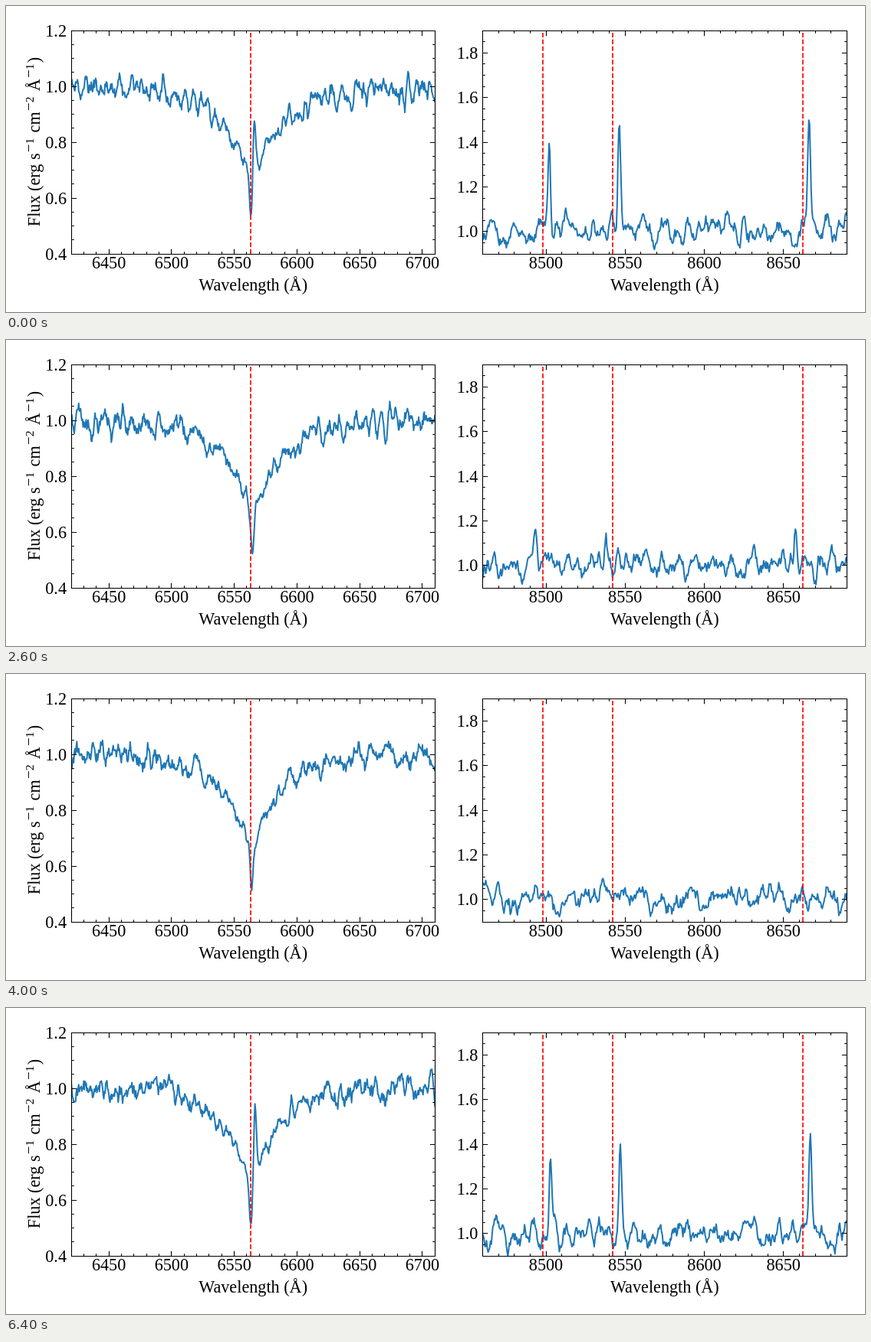
These frames come from a looping animation (1120 px wide and 400 px high, 6600 ms). An HTML page:

```html
<!DOCTYPE html>
<html lang="en">
<head>
<meta charset="utf-8">
<title>Spectra over one orbit</title>
<style>
  html, body { margin: 0; width: 100%; height: 100%; overflow: hidden; background: #fff; }
  svg { display: block; width: 1120px; height: 400px; }
  text { font: 22.2px "Liberation Serif", "Times New Roman", serif; fill: #000; }
  .sup { font-size: 15.5px; }
  .minus { font-size: 19px; }
  .axes { fill: none; stroke: #000; stroke-width: 1.1; }
  .rest { stroke: #f00; stroke-width: 1.67; stroke-dasharray: 6.17 2.67; }
  .flux { fill: none; stroke: #1f77b4; stroke-width: 2; stroke-linejoin: round; }
</style>
</head>
<body>
<svg id="stage" viewBox="0 0 1120 400" xmlns="http://www.w3.org/2000/svg">
  <text transform="translate(43.5 177.5) rotate(-90)" text-anchor="middle">Flux (erg s<tspan class="minus" dx="1.3" dy="-7.5">−</tspan><tspan class="sup">1</tspan><tspan dx="1.7" dy="7.5"> cm</tspan><tspan class="minus" dx="1.3" dy="-7.5">−</tspan><tspan class="sup">2</tspan><tspan dx="1.7" dy="7.5"> Å</tspan><tspan class="minus" dx="1.3" dy="-7.5">−</tspan><tspan class="sup">1</tspan><tspan dx="1.3" dy="7.5">)</tspan></text>
</svg>
<script>
const stage = document.getElementById('stage');
const STEP = 200, COUNT = 33;
const TOP = 32, BOTTOM = 324;
const H_ALPHA = 6562.8;
const CALCIUM = [8498, 8542.1, 8662.1];
const CALCIUM_GAIN = [0.85, 1, 1.02];

// step, line shift in Å at 8542 Å, calcium height, hydrogen height
const ORBIT = [
  [0, 4.1, 0.47, 0.22],
  [3, 0.6, 0.52, 0.31],
  [5, -1.9, 0.48, 0.31],
  [10, -4.7, 0.25, 0.12],
  [15, -4.2, 0.11, 0],
  [20, -0.8, 0.02, 0],
  [24, 2.2, 0.04, 0],
  [28, 5.2, 0.18, 0.08],
  [32, 4.9, 0.41, 0.22],
  [33, 4.1, 0.47, 0.22]
];

function orbitAt(step) {
  const k = ORBIT.findIndex(row => row[0] > step);
  const a = ORBIT[k - 1], b = ORBIT[k];
  const u = (step - a[0]) / (b[0] - a[0]);
  const [, shift, calcium, hydrogen] = a.map((v, j) => v + (b[j] - v) * u);
  return { shift, calcium, hydrogen };
}

const bump = (d, sigma) => Math.exp(-d * d / (2 * sigma * sigma));

function hydrogenFlux(w, step) {
  const { shift, hydrogen } = orbitAt(step);
  const core = H_ALPHA + 1 + 0.9 * Math.sin(2 * Math.PI * (step - 3.4) / COUNT);
  return 1 - 0.345 * Math.exp(-Math.abs(w - H_ALPHA - 1.2) / 24.5)
    - 0.14 * bump(w - core, 1.2)
    + hydrogen * bump(w - H_ALPHA - shift * 0.77, 1.05);
}

function calciumFlux(w, step) {
  const { shift, calcium } = orbitAt(step);
  return CALCIUM.reduce((sum, line, k) =>
    sum + calcium * CALCIUM_GAIN[k] * bump(w - line - shift, 0.85), 1);
}

const PANELS = [
  { x0: 85, x1: 559.3, w0: 6420, w1: 6710, f0: 0.4, f1: 1.2,
    lines: [H_ALPHA], model: hydrogenFlux, noise: 0.027, span: 5, seed: 11 },
  { x0: 621.4, x1: 1096.3, w0: 8460, w1: 8690, f0: 0.9, f1: 1.9,
    lines: CALCIUM, model: calciumFlux, noise: 0.034, span: 6, seed: 71 }
];

function random(seed) {
  return () => {
    seed = seed + 0x6D2B79F5 | 0;
    let t = Math.imul(seed ^ seed >>> 15, 1 | seed);
    t = t + Math.imul(t ^ t >>> 7, 61 | t) ^ t;
    return ((t ^ t >>> 14) >>> 0) / 4294967296;
  };
}

// White noise under a running mean, scaled to unit deviation
function smoothNoise(count, span, seed) {
  const next = random(seed);
  const raw = Array.from({ length: count + span }, () => next() - 0.5);
  return Array.from({ length: count }, (_, i) => {
    let sum = 0;
    for (let j = 0; j < span; j++) sum += raw[i + j];
    return sum * Math.sqrt(12 / span);
  });
}

function add(tag, attrs, label) {
  const el = document.createElementNS(stage.namespaceURI, tag);
  for (const key in attrs) el.setAttribute(key, attrs[key]);
  if (label) el.textContent = label;
  stage.append(el);
  return el;
}

const snap = v => Math.floor(v + 0.01) + 0.5;

function buildPanel(p, index) {
  const X = w => p.x0 + (w - p.w0) / (p.w1 - p.w0) * (p.x1 - p.x0);
  const Y = f => BOTTOM - (f - p.f0) / (p.f1 - p.f0) * (BOTTOM - TOP);
  const left = snap(p.x0), right = snap(p.x1), top = snap(TOP), bottom = snap(BOTTOM);

  const clip = add('clipPath', { id: 'clip' + index });
  clip.append(add('rect', { x: p.x0, y: TOP, width: p.x1 - p.x0, height: BOTTOM - TOP }));
  const curve = add('path', { class: 'flux', 'clip-path': `url(#clip${index})` });

  for (const w of p.lines) {
    const x = Math.round(X(w));
    add('line', { class: 'rest', x1: x, x2: x, y1: BOTTOM, y2: TOP });
  }

  let d = `M${left} ${top}H${right}V${bottom}H${left}Z`;
  for (let w = p.w0; w <= p.w1; w += 10) {
    const major = w % 50 === 0, size = major ? 6.7 : 3.3, x = snap(X(w));
    d += `M${x} ${bottom}v${-size}M${x} ${top}v${size}`;
    if (major) add('text', { x: X(w), y: 343.2, 'text-anchor': 'middle' }, w);
  }
  for (let n = Math.round(p.f0 * 20); n <= p.f1 * 20 + 0.01; n++) {
    const major = n % 4 === 0, size = major ? 6.7 : 3.3, y = snap(Y(n / 20));
    d += `M${left} ${y}h${size}M${right} ${y}h${-size}`;
    if (major) {
      add('text', { x: p.x0 - 6, y: Y(n / 20) + 7.5, 'text-anchor': 'end' }, (n / 20).toFixed(1));
    }
  }
  add('path', { class: 'axes', d });
  add('text', { x: (p.x0 + p.x1) / 2, y: 371.5, 'text-anchor': 'middle' }, 'Wavelength (Å)');

  const samples = (p.w1 - p.w0) * 2 + 1;
  const shapes = Array.from({ length: COUNT }, (_, step) => {
    const noise = smoothNoise(samples, p.span, p.seed + step * 977);
    return 'M' + noise.map((v, i) => {
      const w = p.w0 + i / 2, flux = p.model(w, step);
      const level = p.noise * Math.min(1, flux * flux);
      return X(w).toFixed(2) + ' ' + Y(flux + v * level).toFixed(2);
    }).join('L');
  });
  return step => curve.setAttribute('d', shapes[step]);
}

const show = PANELS.map(buildPanel);
const start = performance.now();
let shown = -1;

function draw() {
  const step = Math.floor((performance.now() - start) / STEP) % COUNT;
  if (step !== shown) {
    show.forEach(panel => panel(step));
    shown = step;
  }
  requestAnimationFrame(draw);
}
draw();
</script>
</body>
</html>
```
